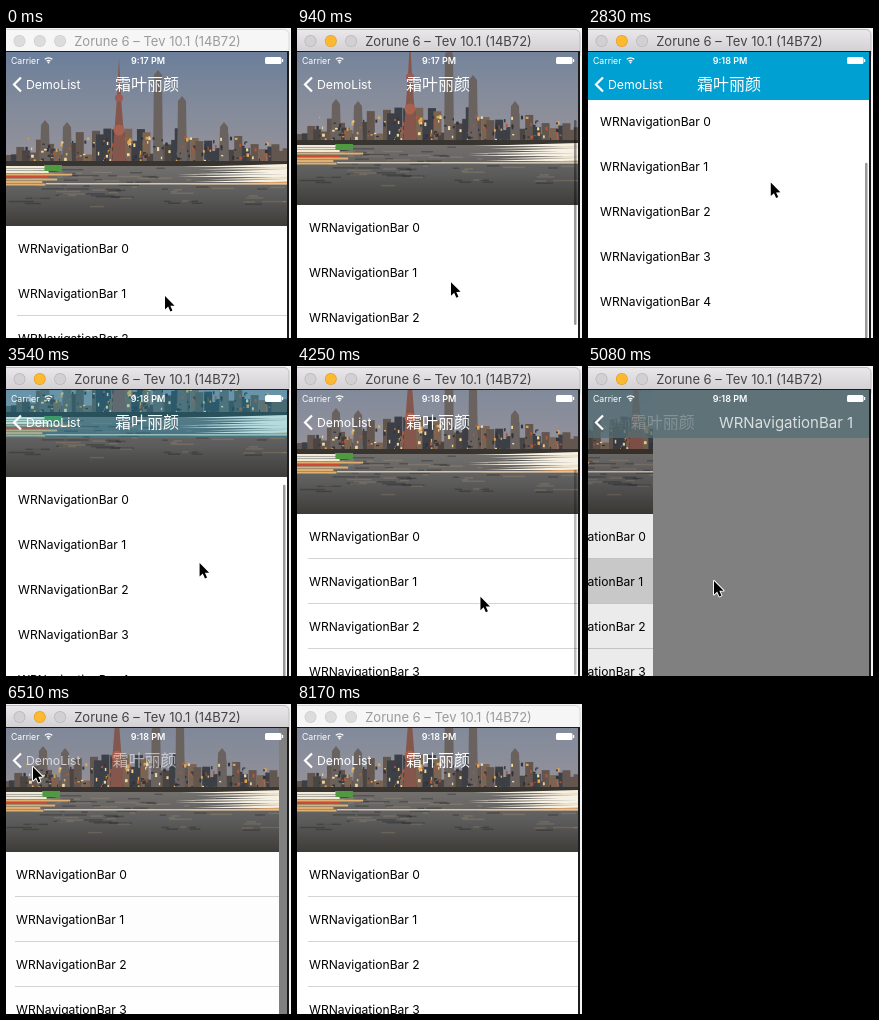
Recreate the animation shown at these times as an HTML page with a canvas. Size 285 by 310 pixels, loop 8.27 s.

```html
<!DOCTYPE html>
<html lang="en">
<head>
<meta charset="utf-8">
<title>Navigation bar demo</title>
<style>
html, body { margin: 0; width: 100%; height: 100%; overflow: hidden; background: #fff; }
canvas { display: block; }
</style>
</head>
<body>
<canvas id="stage" width="285" height="310"></canvas>
<script>
const LOOP = 8270, TICK = 118.2;
const W = 281, H = 310, TOP = 24, BAR = 48, PHOTO = 174, ROW = 45, SHORE = 111;
const FONT = 'Inter, Roboto, sans-serif';
const CJK = '"Noto Sans CJK SC", "Noto Sans CJK", sans-serif';
const BLUE = [0, 160, 210], GREY = [100, 100, 98];

// Moments, in ticks
const DRAG = 5, TURN = 21, RELEASE = 35, PUSH = 42, POP = 52.6, BLUR = 69;
const PEAK = 133, REST = 50;
const REST_AT = [159, 268], PRESS = [152, 288], TAP = [126, 215], BACK = [27, 63], EXIT = [235, 323];

const g = document.getElementById('stage').getContext('2d');

const ramp = (k, a, b) => Math.max(0, Math.min(1, (k - a) / (b - a)));
const mix = (u, a, b) => a.map((v, i) => v + (b[i] - v) * u);

function scrollAt(k) {
  const up = Math.sin(Math.PI / 2 * ramp(k, DRAG, TURN)) ** 1.5;
  const down = Math.cos(Math.PI / 2 * ramp(k, TURN, RELEASE)) ** 1.28;
  return Math.round(k < TURN ? PEAK * up : REST + (PEAK - REST) * down);
}

// 0 = list, 1 = detail page; both ways settle exponentially
function pushAt(k) {
  const settle = start => Math.exp(-1.47 * Math.max(0, k - start));
  return k < POP ? 1 - settle(PUSH) : settle(POP);
}

const dragAt = k => [139.6 + 1.8 * k, 272 - scrollAt(k) + .4 * k];

function pointerAt(k) {
  if (k <= DRAG) return mix(ramp(k, 0, 4), REST_AT, PRESS);
  if (k <= RELEASE) return dragAt(k);
  if (k <= 46) return mix(ramp(k, RELEASE, 39), dragAt(RELEASE), TAP);
  if (k <= 57) return mix(ramp(k, 46, 50), TAP, BACK);
  return mix(ramp(k, 57, 65), BACK, EXIT);
}

function rect(c, color, x, y, w, h) {
  c.fillStyle = color;
  c.fillRect(x, y, w, h);
}

function pill(color, x, y, w, h, r) {
  g.fillStyle = color;
  g.beginPath();
  g.roundRect(x, y, w, h, r);
  g.fill();
}

function shade(c, y0, y1, ...stops) {
  const f = c.createLinearGradient(0, y0, 0, y1);
  stops.forEach((s, i) => f.addColorStop(i / (stops.length - 1), s));
  return f;
}

function disc(c, color, x, y, r) {
  c.fillStyle = color;
  c.beginPath();
  c.arc(x, y, r, 0, 7);
  c.fill();
}

function shape(c, color, ...points) {
  c.fillStyle = color;
  c.beginPath();
  points.forEach(p => c.lineTo(...p));
  c.closePath();
  c.fill();
}

function text(str, x, y, size, color, { font = FONT, align = 'left', weight = 400, alpha = 1 } = {}) {
  g.globalAlpha = alpha;
  g.font = `${weight} ${size}px ${font}`;
  g.textAlign = align;
  g.fillStyle = color;
  g.fillText(str, x, y);
  g.globalAlpha = 1;
}

function makePhoto() {
  const cv = document.createElement('canvas');
  cv.width = W;
  cv.height = PHOTO;
  const c = cv.getContext('2d');
  let seed = 11;
  const rnd = (n = 1) => (seed = seed * 16807 % 2147483647) / 2147483647 * n;
  const pick = list => list[Math.floor(rnd(list.length))];

  rect(c, shade(c, 0, SHORE, '#6b7e9a', '#838b9b', '#95929a'), 0, 0, W, SHORE);
  rect(c, shade(c, SHORE, PHOTO, '#75726f', '#5c5c5c', '#3d3c38'), 0, SHORE, W, PHOTO);

  // Skyline, higher towards the middle
  for (let x = 0; x < W; x += 3 + rnd(6)) {
    const h = 8 + rnd(14 + 14 * Math.sin(Math.PI * x / W));
    rect(c, pick(['#4a4543', '#62564f', '#7a6453', '#3c4046']), x, SHORE - h, 8, h);
  }
  for (const [x, top] of [[39, 68], [61, 70], [152, 18], [176, 44], [218, 70]]) {
    shape(c, '#6a625f', [x - 5, SHORE], [x - 4, top + 5], [x, top], [x + 4, top + 5], [x + 5, SHORE]);
  }
  for (let i = 0; i < 150; i++) {
    const color = pick(['#e0a850', '#f0d8a0', '#b0583c', '#303338', '#303338']);
    rect(c, color, 18 + rnd(W - 36), 84 + rnd(26), 1 + rnd(2), 1 + rnd(3));
  }
  // Spire
  shape(c, '#85564c', [113, 6], [115, 45], [120, SHORE], [106, SHORE], [111, 45]);
  disc(c, '#9c5a55', 113, 46, 4);
  disc(c, '#a8604f', 113, 78, 5.5);

  // Shore, ripples and light trails
  rect(c, '#38342f', 0, SHORE - 2, W, 5);
  for (let i = 0; i < 90; i++) {
    rect(c, pick(['rgba(200,170,130,.2)', 'rgba(25,25,28,.3)']), rnd(W), SHORE + 3 + rnd(40), 5 + rnd(22), 1.5);
  }
  rect(c, '#4f9a40', 38, SHORE + 2, 18, 6);
  for (let y = SHORE + 3; y < SHORE + 22; y += 2.5) {
    rect(c, pick(['#f2ead8', '#cf4a34', '#e0b070', '#f2ead8']), 0, y, 35 + rnd(32), 2);
    const x = 165 + rnd(40);
    shape(c, pick(['#f6f1e4', '#d9a066', '#ece2cc']), [x, y + 1], [W, y - 2], [W, y + 1]);
  }
  rect(c, '#cfc6b4', 40, SHORE + 20, W, 1.5);
  return cv;
}
const photo = makePhoto();

function drawWindow(active) {
  rect(g, '#f4f4f4', 0, 0, 285, H);
  g.fillStyle = active ? shade(g, 2, 24, '#e9e7e9', '#d2d0d2') : '#f6f6f6';
  g.strokeStyle = active ? '#bcbcbc' : '#d8d8d8';
  g.lineWidth = 1;
  g.beginPath();
  g.roundRect(-6, 1.5, 289, 30, 5);
  g.fill();
  g.stroke();
  for (let i = 0; i < 3; i++) {
    const lit = active && i === 1;
    disc(g, lit ? '#e3a02a' : active ? '#b9b7b9' : '#cdcdcd', 13.5 + i * 20.3, 13, 6);
    disc(g, lit ? '#fdb92f' : active ? '#d2d0d2' : '#dcdcdc', 13.5 + i * 20.3, 13, 5.2);
  }
  text('Zorune 6 – Tev 10.1 (14B72)', 151.5, 18, 13, active ? '#444' : '#9b9b9b', { align: 'center' });
  rect(g, '#1c1c1c', 0, TOP - 1, W + 2, H);
}

function drawList(k, s, p) {
  const top = TOP + PHOTO - s;
  const picked = k < PUSH ? 0 : k < POP ? 1 : p;
  const thumb = ramp(k, DRAG, DRAG + 1) * (1 - ramp(k, RELEASE, RELEASE + 3));
  g.save();
  g.translate(Math.round(-.3 * W * p), 0);
  rect(g, '#fff', 0, TOP, W, H);
  g.drawImage(photo, 0, TOP - s);
  for (let i = 0; i < 6; i++) {
    const y = top + i * ROW;
    if (i === 1) rect(g, `rgba(217,217,217,${picked})`, 0, y, W, ROW);
    text('WRNavigationBar ' + i, 12, y + 27, 12.1, '#000');
    if (k > RELEASE || (k <= DRAG && i === 1)) rect(g, '#d4d4d6', 11, y + ROW - 1, W, 1);
  }
  pill(`rgba(0,0,0,${.4 * thumb})`, 277, 83.5 + .404 * s, 2.5, 205, 1.2);
  g.restore();
  rect(g, `rgba(0,0,0,${.1 * p})`, 0, TOP, W, H);
}

function drawStatus(k) {
  text('Carrier', 5, 36, 8.7, '#fff');
  text(k < 12 ? '9:17 PM' : '9:18 PM', 142, 36, 9, '#fff', { align: 'center', weight: 600 });
  g.strokeStyle = '#fff';
  g.lineWidth = 1.3;
  for (const r of [2.6, 5.2]) {
    g.beginPath();
    g.arc(42.5, 35, r, -2.36, -.78);
    g.stroke();
  }
  disc(g, '#fff', 42.5, 34.6, 1);
  pill('#fff', 259, 29, 16.5, 7, 1.5);
  rect(g, '#fff', 276, 31, 1.2, 3);
}

function drawBar(k, s, p) {
  rect(g, `rgba(${BLUE},${ramp(s, 74, 122)})`, 0, TOP, W, BAR);
  rect(g, `rgba(${mix(p ** 7, GREY, BLUE).map(Math.round)},${p})`, 0, TOP, W, BAR);
  drawStatus(k);
  g.strokeStyle = '#fff';
  g.lineWidth = 2.2;
  g.beginPath();
  g.moveTo(15, 49.5);
  g.lineTo(8, 56.5);
  g.lineTo(15, 63.5);
  g.stroke();
  const home = k < POP ? 1 - p : ramp(k, POP, 57);
  text('DemoList', 20, 61, 12.3, '#fff', { alpha: ramp(home, .2, .7) });
  text('霜叶丽颜', 109 - 86 * p, 61.5, 16, '#fff', { font: CJK, alpha: home });
  text('WRNavigationBar 1', 141 + 248 * (1 - p), 61.5, 15, '#fff', { align: 'center', alpha: p });
}

function drawPointer(x, y) {
  g.save();
  g.translate(x, y);
  g.scale(.93, .93);
  g.strokeStyle = '#fff';
  g.lineWidth = 2;
  g.lineJoin = 'round';
  shape(g, '#000', [0, 0], [0, 14.5], [3.4, 11.4], [5.8, 16.6], [8, 15.6], [5.7, 10.6], [10.3, 10.4]);
  g.stroke();
  g.fill();
  g.restore();
}

function frame(now) {
  const k = Math.floor((now % LOOP + 10) / TICK);
  const s = scrollAt(k), p = pushAt(k);
  drawWindow(k > DRAG && k < BLUR);
  g.save();
  g.beginPath();
  g.rect(0, TOP, W, H - TOP);
  g.clip();
  drawList(k, s, p);
  rect(g, '#808080', Math.round(W * (1 - p)), TOP, W, H);
  drawBar(k, s, p);
  g.restore();
  drawPointer(...pointerAt(k));
  requestAnimationFrame(frame);
}
requestAnimationFrame(frame);
</script>
</body>
</html>
```
